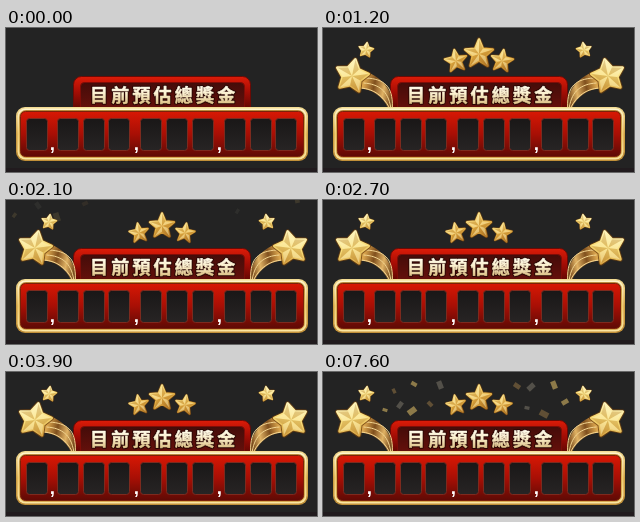
Recreate the animation shown at these times as an HTML page with a canvas. Size 311 px wide and 144 px high, loop 8 s.

```html
<!DOCTYPE html>
<html lang="zh-Hant">
<head>
<meta charset="utf-8">
<style>
html, body { margin: 0; width: 100%; height: 100%; overflow: hidden; background: #232323; }
canvas { display: block; }
</style>
</head>
<body>
<canvas id="stage" width="311" height="144"></canvas>
<script>
const ctx = document.getElementById('stage').getContext('2d');
const LOOP = 8000, STEP = 100, MIRROR = 314;
const PALE = ['#fffbd0', '#f9dd78', '#cf9636'];
const DEEP = ['#fff0a0', '#e9b548', '#a5671c'];

// Value of the step reached since `start`; the last value is held.
const stepped = (t, start, values, before = 0) => {
  const i = Math.floor((t - start) / STEP);
  return i < 0 ? before : values[Math.min(i, values.length - 1)];
};

function gradient(x0, y0, x1, y1, ...colors) {
  const g = ctx.createLinearGradient(x0, y0, x1, y1);
  colors.forEach((c, i) => g.addColorStop(i / (colors.length - 1), c));
  return g;
}

function box(x, y, w, h, radius, fill, stroke) {
  ctx.beginPath();
  ctx.roundRect(x, y, w, h, radius);
  ctx.fillStyle = fill;
  ctx.fill();
  if (stroke) {
    ctx.strokeStyle = stroke;
    ctx.lineWidth = 1;
    ctx.stroke();
  }
}

function group(draw) {
  ctx.save();
  draw();
  ctx.restore();
}

function star(x, y, r, tilt, scale, colors, waist) {
  if (scale <= 0) return;
  group(() => {
    ctx.translate(x, y);
    ctx.scale(scale, scale);
    ctx.rotate(tilt);
    const points = Array.from({ length: 10 }, (_, i) => {
      const a = i * Math.PI / 5 - Math.PI / 2, d = r * 0.9 * (i % 2 ? waist : 1);
      return [Math.cos(a) * d, Math.sin(a) * d];
    });
    ctx.beginPath();
    points.forEach(p => ctx.lineTo(...p));
    ctx.closePath();
    ctx.lineJoin = 'round';
    ctx.strokeStyle = 'rgba(110,66,16,.8)';
    ctx.lineWidth = r * 0.26;
    ctx.stroke();
    ctx.fillStyle = ctx.strokeStyle = gradient(-r * 0.5, -r, r * 0.5, r, ...colors);
    ctx.lineWidth = r * 0.16;
    ctx.stroke();
    ctx.fill();
    // One light and one dark half on every arm
    for (let i = 0; i < 10; i++) {
      ctx.beginPath();
      ctx.moveTo(0, 0);
      ctx.lineTo(...points[i]);
      ctx.lineTo(...points[(i + 1) % 10]);
      ctx.fillStyle = i % 2 ? 'rgba(255,248,200,.4)' : 'rgba(150,90,20,.25)';
      ctx.fill();
    }
  });
}

// Cone of curled ribbon, wide at the star and narrow at the panel
function ribbon() {
  ctx.beginPath();
  ctx.moveTo(34, 60);
  ctx.bezierCurveTo(49, 61, 60, 68, 65, 80);
  ctx.lineTo(70, 80);
  ctx.bezierCurveTo(70, 64, 62, 51, 42, 43);
  ctx.closePath();
  ctx.fillStyle = gradient(40, 60, 70, 67, '#d9a44d', '#80501e', '#e0b264', '#6d4015');
  ctx.fill();
  ctx.strokeStyle = '#f3d591';
  ctx.lineWidth = 1;
  for (const d of [0, 5, 10]) {
    ctx.beginPath();
    ctx.moveTo(38 + d / 2, 60 - d);
    ctx.bezierCurveTo(51 + d, 61 - d, 60 + d, 68 - d, 66 + d / 3, 79);
    ctx.stroke();
  }
}

function sideStars(k, smallK) {
  if (!k) return;
  for (const flip of [false, true]) group(() => {
    if (flip) {
      ctx.translate(MIRROR, 0);
      ctx.scale(-1, 1);
    }
    group(() => {
      ctx.translate(70, 79);
      ctx.scale(k, k);
      ctx.translate(-70, -79);
      ribbon();
      star(29, 48, 18.5, 0.2, 1, PALE, 0.56);
    });
    const away = 1 - smallK;
    star((flip ? 53 : 43) - 8 * away, 22 + 12 * away, 8.5, 0.15 + 3 * away, smallK, PALE, 0.54);
  });
}

// Resting place, size and turn of each paper scrap
const scraps = [
  [91, 12, 6, 0.5], [71, 19, 5, 1.1], [77, 33, 7, 2.2], [89, 39, 9, 2.5],
  [107, 32, 6, 0.8], [117, 13, 8, 1.2], [62, 38, 5, 0.3], [194, 14, 7, 0.6],
  [208, 15, 8, 2.4], [231, 13, 8, 1.2], [221, 42, 9, 0.5], [204, 36, 5, 0.2], [242, 30, 7, 2.6]
];
const paper = ['#a08a50', '#6b5738', '#5c5850'];

function confetti(k, alpha) {
  if (!k || !alpha) return;
  scraps.forEach(([x, y, size, turn], i) => group(() => {
    ctx.globalAlpha = alpha * 0.85;
    ctx.translate(156 + (x - 156) * (0.4 + 0.6 * k), 62 + (y - 62) * k);
    ctx.rotate(turn + (k - 1) * 2);
    ctx.fillStyle = paper[i % 3];
    ctx.fillRect(-size / 2, -size / 3, size, size * 0.66);
  }));
}

function shine(x, y, w, h, radius, at) {
  if (at <= 0 || at >= 1) return;
  group(() => {
    ctx.beginPath();
    ctx.roundRect(x, y, w, h, radius);
    ctx.clip();
    ctx.translate(x + w * at, y);
    ctx.transform(1, 0, -0.5, 1, 0, 0);
    ctx.fillStyle = gradient(-14, 0, 26, 0, 'rgba(255,240,210,0)', 'rgba(255,240,210,.4)', 'rgba(255,240,210,0)');
    ctx.fillRect(-14, 0, 40, h);
  });
}

function title() {
  box(67.5, 48.5, 177, 40, 8, gradient(0, 48, 0, 80, '#de1c08', '#a40d05', '#620803'), '#6b0a05');
  box(74.5, 54.5, 164, 30, 4, gradient(0, 54, 0, 80, '#430c09', '#65100b'), '#7f0d07');
  ctx.font = '900 18px "Noto Sans CJK TC", "Noto Sans CJK", sans-serif';
  ctx.textAlign = 'center';
  ctx.textBaseline = 'alphabetic';
  ctx.lineJoin = 'round';
  [...'目前預估總獎金'].forEach((glyph, i) => {
    const x = 93 + i * 21.2;
    ctx.strokeStyle = '#2b0704';
    ctx.lineWidth = 2.5;
    ctx.strokeText(glyph, x, 73.5);
    ctx.fillStyle = ctx.strokeStyle = gradient(0, 57, 0, 75, '#fffdf0', '#fbefcd', '#dfc58c');
    ctx.lineWidth = 0.5;
    ctx.strokeText(glyph, x, 73.5);
    ctx.fillText(glyph, x, 73.5);
  });
}

function panel() {
  box(10, 79, 292, 54, 9, gradient(0, 79, 0, 133, '#f3dc94', '#cfa145', '#c08f38'));
  box(11.5, 80.5, 289, 51, 8, gradient(0, 81, 0, 131, '#fff6cf', '#f0cc70', '#fbe6a2'));
  box(13, 82, 286, 48, 7, gradient(0, 82, 0, 130, '#b98a3c', '#d9ac50', '#d6aa52'));
  box(14.5, 83.5, 283, 45, 5, gradient(0, 83, 0, 129, '#d91804', '#a80f05', '#5c0a05'), '#7c2109');
  [21, 52, 78, 103, 135, 161, 187, 219, 245, 270].forEach(x =>
    box(x - 0.5, 90.5, 21, 32, 3, gradient(0, 90, 0, 122, '#191717', '#272424'), '#7d2a1e'));
  ctx.font = 'bold 19px "Liberation Sans", sans-serif';
  ctx.fillStyle = '#fff';
  [46.5, 130.5, 213.5].forEach(x => ctx.fillText(',', x, 121.5));
}

function draw(t) {
  ctx.fillStyle = '#232323';
  ctx.fillRect(0, 0, 311, 144);
  ctx.fillStyle = '#211b1e';
  ctx.fillRect(0, 140, 311, 4);

  if (t < 6900) {
    confetti(stepped(t, 1600, [0.6, 1.2, 1.65, 1.8, 1.9, 1.95, 2]),
             stepped(t, 1600, [1, 1, 1, 0.8, 0.5, 0.25, 0]));
  } else {
    confetti(stepped(t, 6900, [0.4, 0.75, 1]), 1);
  }

  const pop = t < 7300 ? stepped(t, 1100, [0.5, 1.15, 1]) : stepped(t, 7300, [1.05, 1.1, 1.05, 1]);
  star(133, 33, 11, -0.15, pop, DEEP, 0.45);
  star(156, 26, 14, 0, pop, DEEP, 0.45);
  star(179, 33, 11, 0.15, pop, DEEP, 0.45);

  title();
  shine(67, 48, 178, 31, [8, 8, 0, 0], stepped(t, 2700, [0, 0.28, 0.52, 0.76, 1]));

  const k = stepped(t, 500, [0.4, 0.7, 0.87, 1.03, 1]);
  const smallK = t < 6900 ? k : stepped(t, 6900, [0.93, 0.97, 1]);
  // Ribbons tuck in behind the panel
  group(() => {
    ctx.beginPath();
    ctx.rect(0, 0, 311, 80);
    ctx.clip();
    sideStars(k, smallK);
  });
  panel();
  shine(10, 79, 292, 54, 9, stepped(t, 3600, [0.18, 0.5, 0.82, 1]));
}

function frame(now) {
  draw(now % LOOP);
  requestAnimationFrame(frame);
}
requestAnimationFrame(frame);
</script>
</body>
</html>
```
